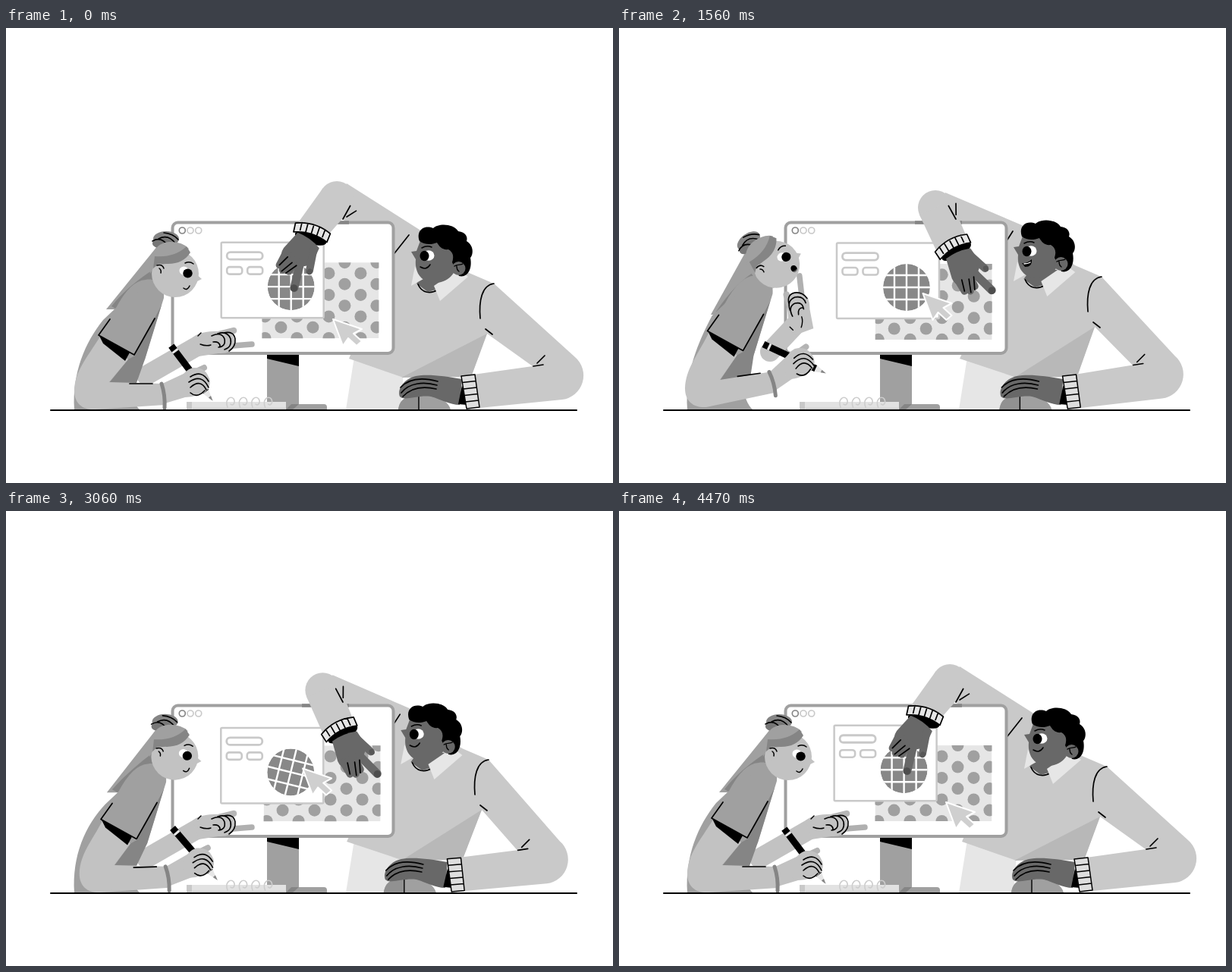
An HTML page for the animation above (4.5 s loop, 800x600 px).

```html
<!DOCTYPE html>
<html lang="en">
<head>
<meta charset="utf-8">
<title>Working together</title>
<style>
html, body { margin: 0; width: 100%; height: 100%; overflow: hidden; background: #fff; }
svg { display: block; width: 800px; height: 600px; }
</style>
</head>
<body>
<svg id="stage" viewBox="0 0 800 600" xmlns="http://www.w3.org/2000/svg">
<defs><clipPath id="disc"><circle r="31"/></clipPath><clipPath id="panel"><rect width="154" height="100"/></clipPath></defs>
<g id="art"></g>
</svg>
<script>
const LOOP = 4500, STEP = 30;
const SKIN = '#c2c2c2', MID = '#a0a0a0', DARK = '#858585', KNIT = '#c9c9c9', PALE = '#e6e6e6', DEEP = '#686868';
const art = document.getElementById('art');

// Drawing helpers
const path = (d, fill) => `<path d="${d}" fill="${fill}"/>`;
const line = (d, color = '#000', w = 1.7) =>
  `<path d="${d}" fill="none" stroke="${color}" stroke-width="${w}" stroke-linecap="round" stroke-linejoin="round"/>`;
const oval = (x, y, rx, ry, fill) => `<ellipse cx="${x}" cy="${y}" rx="${rx}" ry="${ry}" fill="${fill}"/>`;
const dot = (x, y, r, fill) => oval(x, y, r, r, fill);
const frame = (x, y, w, h, r, color, sw, fill = 'none') =>
  `<rect x="${x}" y="${y}" width="${w}" height="${h}" rx="${r}" fill="${fill}" stroke="${color}" stroke-width="${sw}"/>`;
const box = (x, y, w, h, fill) => `<rect x="${x}" y="${y}" width="${w}" height="${h}" fill="${fill}"/>`;
const group = (tf, ...kids) => `<g transform="${tf}">${kids.join('')}</g>`;
const place = (p, turn = 0) => `translate(${p}) rotate(${turn})`;
const poly = (fill, ...pts) => path('M' + pts.join('L') + 'Z', fill);

// Motion helpers
const add = (p, x, y) => [p[0] + x, p[1] + y];
const mix = (a, b, k) => a + (b - a) * k;
const spin = (x, y, deg) => {
  const a = deg * Math.PI / 180, c = Math.cos(a), s = Math.sin(a);
  return [x * c - y * s, x * s + y * c];
};
const ease = (t, a, b) => {
  const u = Math.min(1, Math.max(0, (t - a) / (b - a)));
  return u * u * (3 - 2 * u);
};
const pulse = (t, a, b, c, d) => ease(t, a, b) - ease(t, c, d);
const drift = (t, mid, size, low) => mid - size * Math.cos(2 * Math.PI * (t - low) / LOOP);

// A few levels from 0 to 1 drive both people and the cursor
function pose(t) {
  const reach = pulse(t, 480, 1080, 2950, 4250), settle = reach * (2 - reach);
  const drag = pulse(t, 2050, 2550, 2650, 3300);
  const slide = (pulse(t, 1150, 1550, 3550, 4250) + drag) / 2;
  const mouse = -25 * slide * (1.5 - slide / 2);
  const lift = .22 * ease(t, 0, 480) + .78 * ease(t, 480, 1080) - .62 * ease(t, 1560, 2550) - .38 * ease(t, 2550, 3400);
  const forward = pulse(t, 2550, 3540, 3540, 4470);
  return {
    t, reach, drag, slide, mouse, lift, forward, lean: lift * lift, nod: lift - .2 * forward,
    wave: pulse(t, 500, 1060, 1650, 2400), ponder: pulse(t, 1080, 1540, 1650, 2400),
    torso: [-7 * settle, -9 * settle], manHead: [-14 * reach, -6 * settle],
    raised: [mix(436, 417, reach), mix(225, 237, reach) - 24 * reach * (1 - reach)],
    rest: [729 - 4 * settle + .85 * mouse, 458 - 14 * settle - .8 * mouse],
    cuffTurn: -5 * settle - .35 * mouse
  };
}

function monitor() {
  const lamp = (x, color) => `<circle cx="${x}" cy="267" r="4" fill="none" stroke="${color}" stroke-width="1.7"/>`;
  return box(344, 429, 42, 74, MID) + poly('#000', '344,430', '386,430', '386,446', '344,436') +
    path('M369 503V499Q370 496 374 496H419Q423 496 423 500V503Z', MID) + poly(DARK, '369,503', '376,496', '386,496', '378,503') +
    frame(219.5, 256.5, 291, 172.5, 7, MID, 4, '#fff') + box(390, 254.3, 62, 4.4, DARK) +
    lamp(232.3, DARK) + lamp(243, KNIT) + lamp(253.7, KNIT);
}

function screen(p) {
  let dots = box(0, 0, 154, 100, PALE), bars = '';
  for (let c = 0; c < 8; c++)
    for (let r = 0; r < 4; r++) dots += dot(4 + 21 * c, (c % 2 ? 0 : 14.3) + 28.5 * r, 8, MID);
  for (const k of [-16, 0, 16]) bars += line(`M${k} -32V32M-32 ${k}H32`, '#fff', 2.4);
  const panel = [drift(p.t, 338.2, 1.4, 700), drift(p.t, 309.8, 1.2, 3800)];
  const win = [drift(p.t, 284.7, 2.3, 3700), drift(p.t, 284, 2, 600)];
  return group(place(panel), `<g clip-path="url(#panel)">${dots}</g>`) +
    group(place(win),
      frame(0, 0, 135, 99.5, 1.5, KNIT, 2.5, '#fff'), frame(7.5, 13, 47, 9.5, 4.5, KNIT, 2.8),
      frame(7.5, 32.5, 20, 9.5, 3.5, KNIT, 2.6), frame(34.5, 32.5, 20, 9.5, 3.5, KNIT, 2.6),
      group('translate(92 58.5)', `<g clip-path="url(#disc)">${dot(0, 0, 31, '#888')}${group(`rotate(${45 * p.drag})`, bars)}</g>`)) +
    group(place([432 - 61 * p.slide, 385 - 68 * p.slide]),
      '<path d="M-1 -1L37 12L26 18L37 28L30 34L19 24L12 34Z" fill="#cfcfcf" stroke="#fff" stroke-width="2" stroke-linejoin="round"/>');
}

function notebook() {
  let s = box(238, 493, 131, 10, '#e2e2e2') + box(238, 493, 7, 10, KNIT) + line('M246 502H368', KNIT, 1.5);
  for (let i = 0; i < 4; i++) s += group(`translate(${296 + 16.5 * i} 0)`, line('M-4 500C-8 490 0 484 4 489C7 494 3 499 0 496', '#cdcdcd', 1.6));
  return s;
}

function manBody({ torso, manHead, raised, reach, mouse }) {
  const inner = add(torso, 634, 403), hem = [613 + .6 * mouse, 460];
  return poly(PALE, '459,434', '448,503', '520,503', '524,455') +
    poly(KNIT, add(raised, 13, -20), add(manHead, 545, 266), add(torso, 608, 322), add(torso, 643, 337), inner, hem, [521, 460],
      [452 - 3 * reach, 436], [480, 370], [455, 262], add(raised, 0, 20)) +
    poly('#b8b8b8', inner, hem, [521, 461]) +
    line(`M512 ${297 - 18 * reach}L${531 - 12 * reach} ${273 - 5 * reach}`);
}

function restArm({ torso, rest, mouse, cuffTurn }) {
  const T = (x, y) => add(torso, x, y), E = (x, y) => add(rest, x, y);
  let ribs = '';
  for (let i = 1; i < 5; i++) ribs += `M${600 + i * 1.4} ${459 + i * 8.5}L${618 + i * 1.2} ${457 + i * 8.5}`;
  const cuff = 'M600 459L618 457L624 500L607 502Z';
  return path(`M${T(643, 337)}L${E(21, -24)}A32 32 0 0 1 ${E(4, 32)}L${624 + mouse} 501L${616 + mouse} 457L${E(-35, -12)}L${T(634, 403)}L${T(622, 372)}Z`, KNIT) +
    line(`M${T(643, 337)}C${T(627, 339)} ${T(623, 360)} ${T(625, 383)}M${T(632, 397)}L${T(641, 404)}`) +
    line(`M${E(-34, -12)}L${E(-21, -14)}M${E(-29, -16)}L${E(-19, -26)}`) +
    group(place([mouse, 0]),
      path('M517 503C519 490 526 485 545 484C566 483 582 490 586 503Z', MID),
      path('M517 503C519 490 526 485 544 484V503Z', '#919191'), line('M544 486V503', '#000', 1.4),
      path('M519 486C515 475 526 462 540 459C556 456 578 459 601 463L598 497C585 497 574 490 560 486C546 484 530 490 522 488Z', DEEP),
      line('M520 474C532 461 550 461 569 466M521 481C531 468 550 466 568 471M523 486C535 473 550 472 567 476'),
      group(`rotate(${cuffTurn} 608 480)`, poly('#000', '601,471', '596,496', '608,497'), path(cuff, '#dedede'), line(cuff + ribs, '#000', 1.5)));
}

function manHead({ t, manHead: H }) {
  const beat = t % 1080, open = t < 1900 && beat > 390 && beat < 800;
  return group(place([H[0] * .55, H[1]]),
      poly(DEEP, '550,325', '541,337', '556,348', '570,344', '592,325'), line('M543 338C548 350 560 351 569 345'),
      poly(PALE, '596,318', '609,328', '572,360', '564,340')) +
    group(place(H),
      poly(PALE, '539,314', '534,340', '550,331'),
      path('M547 278L541 294L534 295L540 305C538 326 551 337 567 336C585 335 597 320 594 300L588 280Z', DEEP),
      path('M545 281C540 267 551 259 563 264C570 257 590 258 596 268C606 269 609 276 607 281C617 287 616 299 612 303C615 318 608 330 597 327L588 309Q592 297 583 292C575 293 571 288 568 283C561 286 551 286 545 281Z', '#000'),
      dot(596.5, 317, 9, DEEP), line('M591 314C595 311 600 313 602 311M594 314Q594 319 597 321', '#000', 1.4),
      oval(557, 300, 7.5, 6.8, '#fff'), oval(551.5, 300.5, 6, 6.8, '#000'), line('M548 290Q555 286 561 289', '#000', 1.5),
      open ? path('M545 316Q552 317 558 311Q559 321 549 321Z', '#000') + line('M548 317Q553 317 556 315', '#fff', 1.5)
        : line('M546 315Q554 320 559 312', '#000', 1.5));
}

function raisedArm({ raised: [ex, ey], reach }) {
  const wrist = [mix(403, 440, reach), mix(269, 288, reach)], cuff = mix(17, -29, reach), hand = mix(34, -25, reach);
  const dx = wrist[0] - ex, dy = wrist[1] - ey, k = 23 / Math.hypot(dx, dy);
  const corner = x => add(spin(x, -3, cuff), ...wrist);
  let ribs = '';
  for (let x = -16; x <= 16; x += 8) ribs += `M${x} -8L${x * .96} 2`;
  const band = 'M-24 -5Q0 -15 24 -5L23 7Q0 -2 -23 7Z';
  return dot(ex, ey, 23, KNIT) + poly(KNIT, [ex - dy * k, ey + dx * k], corner(-22), corner(22), [ex + dy * k, ey - dx * k]) +
    group(place([444, 252], mix(29, -29, reach)), line('M0 0V-20M3 -5L10 -18')) +
    group(place(wrist, cuff), oval(1, 8, 21.5, 8, '#000')) +
    group(place(wrist, hand),
      path('M-15 11L-19 38Q-19 48 -12 50L12 48L24 36L20 12Q2 7 -15 11Z', DEEP),
      line('M-13 42L-11 60M-5 42L-4 63M3 42L4 60', DEEP, 9.5), line('M10 42L22 74', DEEP, 11), line('M15 18L26 44', DEEP, 10),
      dot(22, 74.5, 4.8, '#4e4e4e'), oval(27, 45, 3.5, 4, '#575757'), line('M-8 45L-11 60M1 48L-4 65M8 48L2 64')) +
    group(place(wrist, cuff), path(band, PALE), line(band + ribs, '#000', 1.7));
}

function farArm({ wave, ponder }) {
  const wrist = [262 - 22 * wave - 5 * ponder, 412 - 23 * wave];
  return line(`M${185 + 14 * wave} ${458 - 31 * wave}L${add(wrist, -4, 4)}`, SKIN, 26) +
    group(place(wrist, -78 * wave - 14 * ponder),
      line('M12 9L62 5', '#b0b0b0', 7.5), line('M6 -5L38 -13', '#b6b6b6', 8.5),
      path('M-16 -4Q-4 -13 16 -12L34 -10Q42 -2 38 9Q34 18 18 17L-8 21Z', SKIN),
      line('M9 -6Q22 -12 26 -2Q28 8 18 9M17 -9Q30 -13 34 -2Q36 9 26 12M25 -10Q38 -13 40 -2Q41 8 32 14M11 2Q20 1 20 8', '#000', 1.6),
      line('M-9 -6L-5 -10M-6 5Q2 8 8 6', '#000', 1.4));
}

const nose = ({ nod }) => [[257 - 18 * nod, 331 - 33 * nod], -35 * nod];
const bracelet = ({ lean, forward }) => [[208 - 5 * lean + 11 * forward, 484 - 16 * lean], -8 * lean - 3 * forward];

function womanBody(p) {
  const { lean, forward } = p, [tip, tilt] = nose(p), [band, turn] = bracelet(p);
  const head = (x, y) => add(spin(x - 257, y - 331, tilt), ...tip);
  const s = (x, y) => [x - 5.5 * lean + 6 * forward, y - 5.5 * lean + 3 * forward];
  const e = (x, y) => [x - 3 * lean + 13 * forward, y - 3 * lean];
  const wrist = (x, y) => add(spin(x, y, turn), ...band);
  const tail = [132 - 11 * lean + 2 * forward, 371 + 7 * lean];
  return path(`M${head(200, 287)}L${tail}L${add(tail, 14, 0)}L${s(190, 350)}L${head(206, 322)}Z`, MID) +
    path(`M${head(198, 316)}Q${s(160, 340)} ${add(tail, 7, -4)}L${add(tail, 14, 0)}L${s(180, 345)}L${head(206, 326)}Z`, DARK) +
    poly(SKIN, head(204, 325), s(190, 340), s(206, 350), head(218, 350)) +
    poly('#000', s(201, 333), s(208, 340), s(206, 345)) +
    path(`M${s(184, 332)}C${s(198, 329)} ${s(210, 340)} ${s(208, 356)}L${s(183, 437)}L163 470Q166 494 176 503H90C87 455 104 415 ${s(128, 385)}L${s(145, 369)}Q${s(164, 333)} ${s(184, 332)}Z`, MID) +
    poly(DARK, s(205, 365), s(170, 432), s(161, 437), e(136, 468), [172, 468], s(183, 437)) +
    path(`M${s(124, 407)}C${e(106, 436)} ${e(91, 452)} ${e(90, 478)}C${e(90, 496)} ${e(102, 504)} ${e(118, 503)}L${wrist(1, 13)}L${wrist(-2, -15)}L${e(136, 467)}L${s(161, 437)}Z`, SKIN) +
    poly('#000', s(123, 406), s(128, 416), s(157, 439), s(163, 428)) +
    poly(MID, s(145, 369), s(122, 405), s(169, 431), s(205, 365), s(184, 340)) +
    line(`M${s(137, 384)}L${s(122, 405)}L${s(169, 431)}L${s(196, 383)}M${wrist(-45, -15)}L${wrist(-15, -15)}`);
}

function drawingHand(p) {
  const { lift, forward } = p, [band, turn] = bracelet(p);
  const hand = [250 - 11 * lift + 13 * forward, 468 - 26 * lift];
  const wrist = y => add(spin(-2, y, turn), ...band);
  return group(place([272 + 12 * forward, 491 - 36 * lift], 53 - 28 * lift),
      box(-90, -4.5, 76, 9, '#000'), box(-83, -4.5, 3, 9, PALE), poly(PALE, '-14,-4.5', '-14,4.5', '0,0'), poly(DARK, '-6,-2', '-6,2', '1,0')) +
    poly(SKIN, wrist(-15), add(hand, -14, -13), add(hand, -4, 16), wrist(12)) +
    group(place(hand, -10 * lift),
      line('M-10 -10L11 -20', '#b4b4b4', 8),
      path('M-20 -6Q-14 -17 -4 -20Q11 -21 16 -10Q21 -2 17 7Q12 15 0 17Q-14 21 -22 16Z', SKIN),
      line('M-7 -8Q8 -18 17 -2M-9 -1Q8 -13 17 6M-7 6Q6 -6 14 9M-7 13Q2 21 12 10', '#000', 1.6)) +
    group(place(band, turn), line('M-3 -15Q2 0 1 17', DARK, 5));
}

function womanHead(p) {
  const [tip, tilt] = nose(p), blink = p.t > 400 && p.t < 550, open = p.t > 300 && p.t < 1900;
  return group(place(tip, tilt) + ' translate(-257 -331)',
    oval(211, 278, 17, 10, DARK), oval(206, 284, 13, 7, '#777'),
    line('M193 281Q205 274 214 288M201 278Q214 271 224 285M208 270Q220 271 227 279', '#000', 1.6),
    dot(223, 324, 31, SKIN), poly(SKIN, '248,322', '258,331', '246,337'),
    path('M190 324C187 300 197 283 216 282Q233 282 241 291Q224 305 197 311Z', MID),
    path('M196 301Q222 303 238 288L243 296Q233 312 211 311Q199 311 194 317Z', DARK),
    oval(203, 320, 7, 9, SKIN), line('M199 313Q206 311 208 317M202 317Q205 319 204 323', '#000', 1.5),
    line('M236 310Q242 307 247 311', '#000', 1.5),
    blink ? line('M232 322Q239 327 247 324') : oval(234.5, 320, 6, 5.5, '#fff') + oval(239.5, 323.5, 6.2, 6, '#000'),
    open ? oval(239, 342, 4, 4.6, '#000') + line('M237 345Q239 347 241 345', '#888', 1.2) : line('M234 343Q239 347 242 340', '#000', 1.5));
}

function draw(t) {
  const p = pose(t);
  art.innerHTML = manBody(p) + restArm(p) + manHead(p) + monitor() + screen(p) + raisedArm(p) +
    notebook() + farArm(p) + womanBody(p) + drawingHand(p) + womanHead(p) + line('M59 504H752', '#000', 2);
}

const start = performance.now();
function tick() {
  const t = (performance.now() - start) % LOOP;
  draw(Math.floor(t / STEP) * STEP);
  requestAnimationFrame(tick);
}
tick();
</script>
</body>
</html>
```
